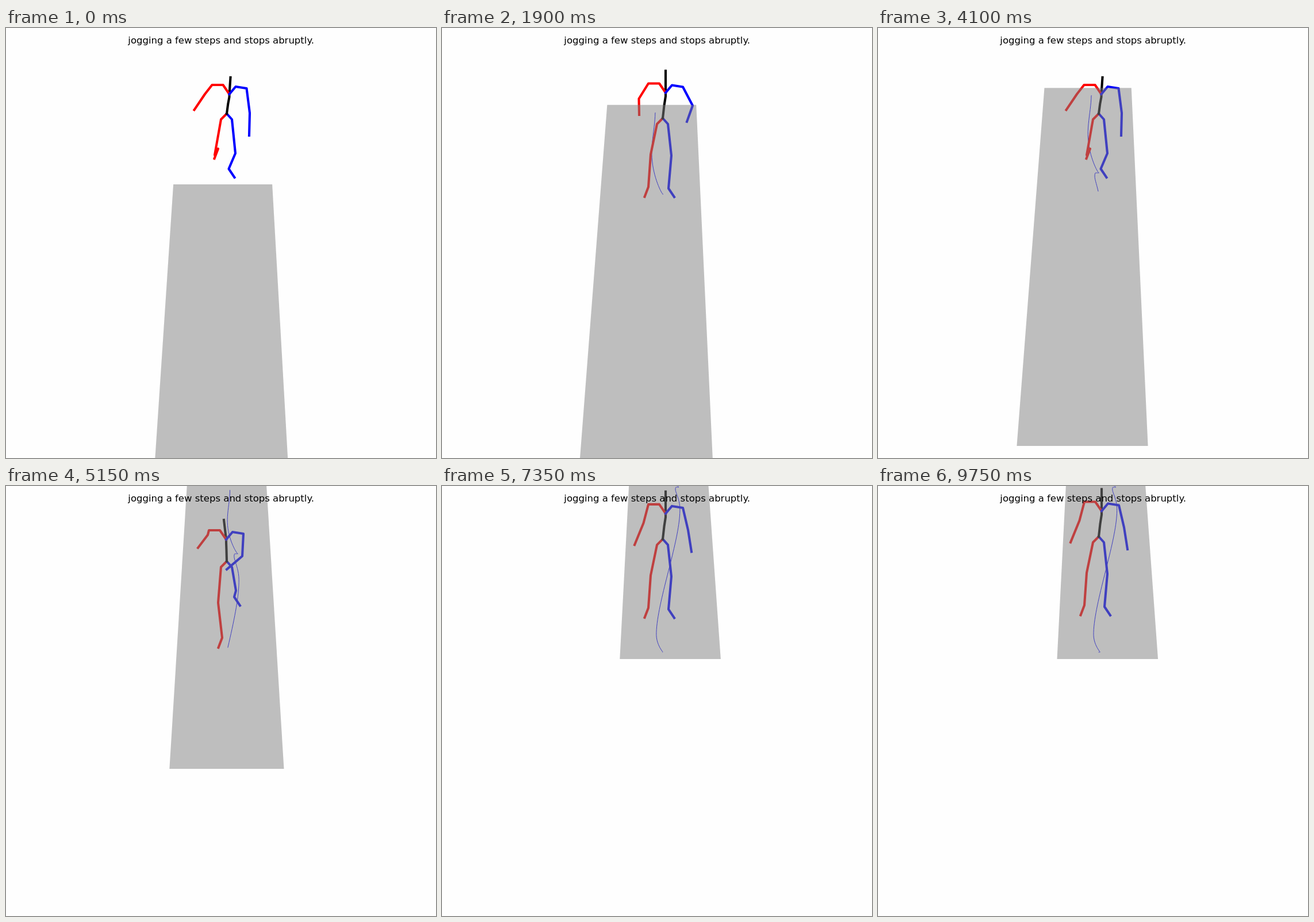
An HTML page with a canvas that plays this animation: 748 px wide and 748 px high, repeating every 9.8 s.

```html
<!DOCTYPE html>
<html lang="en">
<head>
<meta charset="utf-8">
<title>Jogging figure</title>
<style>
html, body { margin: 0; width: 100%; height: 100%; overflow: hidden; background: #fefefe; }
canvas { display: block; width: 748px; height: 748px; }
</style>
</head>
<body>
<canvas id="stage" width="748" height="748"></canvas>
<script>
const ctx = document.getElementById('stage').getContext('2d');
const LOOP = 9800, STEP = 50, CX = 384, GAIT = 700;
const RED = '#f00', BLUE = '#00f', BLACK = '#000';

const mix = (a, b, k) => a + (b - a) * k;
const mixPoint = (p, q, k) => [mix(p[0], q[0], k), mix(p[1], q[1], k)];
const add = (p, x, y) => [p[0] + x, p[1] + y];

// Eases from one [time, value] key to the next.
function glide(t, ...keys) {
  let i = 0;
  while (i < keys.length - 2 && keys[i + 1][0] <= t) i++;
  const [t0, v0] = keys[i], [t1, v1] = keys[i + 1];
  const k = Math.max(0, Math.min(1, (t - t0) / (t1 - t0)));
  return mix(v0, v1, k * k * (3 - 2 * k));
}

const distance = t => t < 3450
  ? glide(t, [-900, -.0574], [1400, .1117])
  : glide(t, [3450, .1117], [6675, .3673]);
const sideways = t => glide(t, [0, .54], [520, .508], [1450, .627], [3000, .612],
  [3700, .584], [4250, .634], [6080, .36], [6650, .4255], [7350, .4255], [9000, .413]);
const effort = t => glide(t, [0, 1], [700, 1], [1300, 0], [3450, 0], [3900, 1], [5300, 1], [6550, 0]);
const hipHeight = t => glide(t, [5500, 157], [6700, 93], [9750, 88]);
const armBend = t => glide(t, [0, 0], [1300, 1], [3450, 1], [4000, 0]);

// Joints relative to the hip; the runner swings between the two lifts.
const standing = {
  kneeR: [-21, 63], ankleR: [-25, 119.5], kneeL: [15, 65], ankleL: [10, 122],
  chest: [5, -44.5], head: [5, -82.5],
  elbowR: [-33.5, -28], wristR: [-49, 10], elbowL: [44, -16], wristL: [50, 22]
};
const liftRight = {
  kneeR: [-21, 72], ankleR: [-15, 61], kneeL: [15, 69], ankleL: [3.5, 96],
  chest: [4.5, -34], head: [6.5, -63],
  elbowR: [-38, -34], wristR: [-56.5, -6.5], elbowL: [40, -1], wristL: [39, 38]
};
const liftLeft = {
  kneeR: [-15, 72], ankleR: [-8, 133], kneeL: [16, 51], ankleL: [13, 62],
  chest: [-1, -38], head: [-5, -72],
  elbowR: [-33, -46], wristR: [-50, -23.5], elbowL: [27, -9], wristL: [0, 14]
};

function limbs(t) {
  const start = t < 2500 ? 0 : 4100;
  const swing = (1 + Math.cos(2 * Math.PI * (t - start) / GAIT)) / 2;
  const power = effort(t), armPower = power ** .25, bend = armBend(t);
  const joint = (name, k = power) =>
    mixPoint(standing[name], mixPoint(liftLeft[name], liftRight[name], swing), k);

  const hip = [0, 0], chest = joint('chest'), head = joint('head');
  const leg = (side, hipX, footX, footY) => {
    const ankle = joint('ankle' + side);
    return [hip, [hipX, 10], joint('knee' + side), ankle, add(ankle, footX, footY)];
  };
  const arm = (side, out, drop) => [
    chest, add(chest, out * 11, drop - 16), add(chest, out * 30, 2 * drop - 16),
    add(joint('elbow' + side, armPower), out * 8 * bend, -6 * bend),
    add(joint('wrist' + side, armPower), -out * 8 * bend, -16 * bend)
  ];
  const spine = [hip, mixPoint(hip, chest, .5), [chest[0], chest[1] * .86], chest,
    mixPoint(chest, head, .72), head];

  const y = hipHeight(t) - power * mix(26, 8, swing);
  return [
    [RED, leg('R', -10, -6.5, 17)], [BLUE, leg('L', 9, 10, 15)], [BLACK, spine],
    [RED, arm('R', -1, 0)], [BLUE, arm('L', 1, 3)]
  ].map(([color, points]) => [color, points.map(p => add(p, CX, y))]);
}

// Floor point to screen: depth z from the figure, x in floor widths.
function project(x, z) {
  const w = 174.1 / (1 - z);
  return [CX + x * w, (w - 138.4) / .1235];
}

function trace(points) {
  ctx.beginPath();
  points.forEach(p => ctx.lineTo(...p));
}

function line(points, color, width) {
  trace(points);
  ctx.strokeStyle = color;
  ctx.lineWidth = width;
  ctx.stroke();
}

function draw(t) {
  const run = distance(t), side = sideways(t);
  ctx.fillStyle = '#fefefe';
  ctx.fillRect(0, 0, 748, 748);
  ctx.lineJoin = 'round';
  ctx.lineCap = 'square';

  const path = [];
  for (let s = 0; s < t; s += STEP) path.push(project(sideways(s) - side, distance(s) - run));
  line(path, BLUE, 1);
  limbs(t).forEach(([color, points]) => line(points, color, 4.1));

  const far = -.0122 - run, near = .3757 - run;
  trace([project(-side, far), project(1 - side, far), project(1 - side, near), project(-side, near)]);
  ctx.fillStyle = 'rgba(128,128,128,.5)';
  ctx.fill();

  ctx.fillStyle = BLACK;
  ctx.font = '16.5px "DejaVu Sans", sans-serif';
  ctx.fillText('jogging a few steps and stops abruptly.', 212.3, 27);
}

function tick() {
  draw(Math.floor(performance.now() % LOOP / STEP) * STEP);
  requestAnimationFrame(tick);
}
tick();
</script>
</body>
</html>
```
